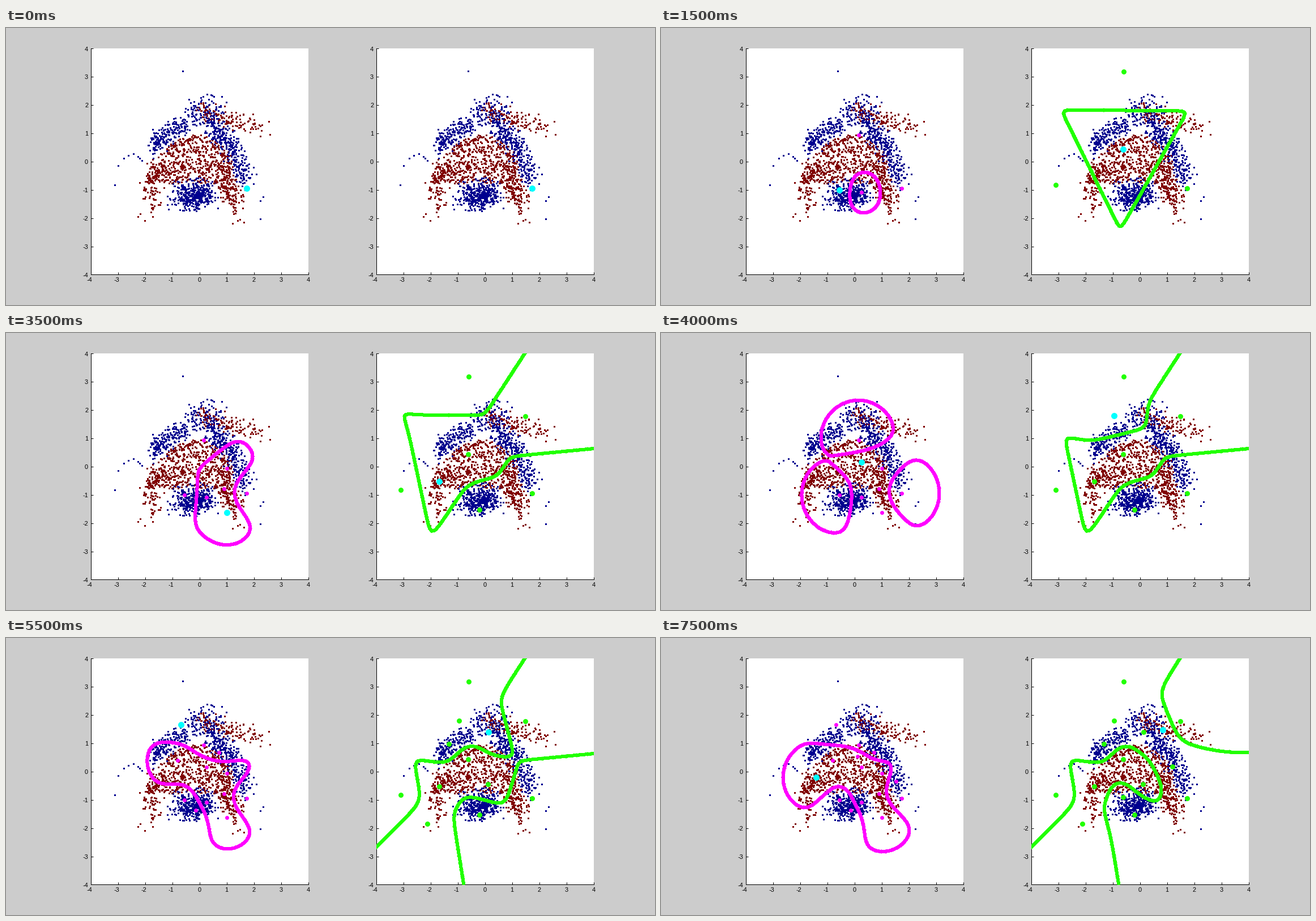
Recreate the animation shown at these times as a matplotlib script. Size 1146 by 489 pixels, loop 8000 ms.

```python
import numpy as np
import matplotlib.pyplot as plt
from matplotlib.animation import FuncAnimation

W, H, DPI = 1146, 489, 100
PX = 72 / DPI
TOP, BOTTOM, LEFTS, WIDTH = 36.5, 435.5, (149.5, 653.5), 384
NAVY, MAROON = "#00008f", "#800000"
MAGENTA, GREEN, CYAN = "#ff00ff", "#21ff00", "#00ffff"
GAMMA = 2.0

# Queried points in order: x, y, class (1 = red, -1 = blue)
LEFT = np.array([
    (1.73, -.94, -1), (.15, .95, -1), (.27, -1.08, 1), (-.55, -1.0, -1),
    (.90, -.78, 1), (1.0, -.07, 1), (1.02, -1.63, 1), (.25, .17, 1),
    (-.80, .40, 1), (.72, .68, -1), (-.13, -1.37, -1), (-.68, 1.67, -1),
    (.12, .55, 1), (1.53, -.35, -1), (-1.40, -.21, 1)])
RIGHT = np.array([
    (1.73, -.94, -1), (-3.1, -.83, -1), (-.60, 3.19, -1), (-.62, .44, 1),
    (-.20, -1.53, -1), (1.48, 1.78, 1), (-1.68, -.52, 1), (-.95, 1.81, -1),
    (.11, -.45, 1), (-2.12, -1.85, 1), (-1.33, .99, -1), (.13, 1.40, -1),
    (1.20, .19, -1), (-.62, -.91, -1), (.85, 1.48, -1)])
SHOWN = [1, 2, 3, 4, 5, 6, 6, 7, 8, 9, 10, 12, 12, 13, 14, 15]

axis = np.linspace(-4.1, 4.1, 104)
GX, GY = np.meshgrid(axis, axis)
GRID = np.column_stack([GX.ravel(), GY.ravel()])


def kernel(a, b):
    return np.exp(-GAMMA * ((a[:, None] - b[None]) ** 2).sum(-1))


def svm_field(pts, y):
    """Hard-margin RBF classifier solved with a small active set."""
    K = kernel(pts, pts)
    act = list(range(len(y)))
    for _ in range(80):
        ya = y[act]
        A = np.zeros((len(act) + 1,) * 2)
        A[0, 1:] = A[1:, 0] = ya
        A[1:, 1:] = np.outer(ya, ya) * K[np.ix_(act, act)]
        sol = np.linalg.solve(A, np.r_[0, np.ones(len(act))])
        bias, alpha = sol[0], sol[1:]
        if alpha.min() < 0:
            act.pop(int(alpha.argmin()))
            continue
        margin = y * (K[:, act] @ (alpha * ya) + bias)
        worst = int(margin.argmin())
        if margin[worst] > 1 - 1e-6:
            break
        act.append(worst)
    return kernel(GRID, pts[act]) @ (alpha * ya) + bias


def parzen_field(pts, y):
    K = kernel(GRID, pts)
    return np.log(K[:, y > 0].sum(1)) - np.log(K[:, y < 0].sum(1))


def boundary(ax, field, data):
    """Zero line of the field, plus the spots where the stroke steps."""
    pts, y = data[:, :2], data[:, 2]
    if abs(y.sum()) == len(y):
        return np.empty((0, 2)), np.empty((0, 2))
    cs = ax.contour(GX, GY, field(pts, y).reshape(GX.shape), [0])
    segs = [s for s in cs.allsegs[0] if len(s) > 2]
    cs.remove()
    line, bumps = [], []
    for s in segs:
        cell = np.round(s * (24, 25))
        step = (np.diff(cell, axis=0) != 0).all(1)
        bumps.append(s[1:][step])
        line += [s, [[np.nan, np.nan]]]
    return np.vstack(line), np.vstack(bumps)


def band(rng, n, xs, ys, sx, sy):
    """Points scattered around a polyline."""
    t = rng.uniform(0, len(xs) - 1, n)
    knots = np.arange(len(xs))
    jitter = np.clip(rng.normal(size=(n, 2)), -2.1, 2.1) * (sx, sy)
    return np.column_stack([np.interp(t, knots, xs), np.interp(t, knots, ys)]) + jitter


def make_cloud():
    rng = np.random.default_rng(7)
    blue = np.vstack([
        band(rng, 185, [-1.7, -1.25, -.5], [.55, .95, 1.4], .16, .21),
        band(rng, 105, [-.3, .1, .7], [1.65, 1.8, 1.75], .19, .26),
        band(rng, 330, [.4, .75, 1.05, 1.4, 1.75], [1.4, .95, .65, .1, -.6], .16, .22),
        band(rng, 390, [-.75, -.2, .25], [-1.15, -1.2, -1.1], .24, .26),
        [(-.6, 3.19), (-3.1, -.83), (-2.97, -.16), (-2.78, .11), (-2.6, .22),
         (-2.42, .27), (-2.25, .17), (-2.18, .12), (-2.1, .03), (2.24, -2.04),
         (2.35, -1.25), (2.26, -1.4), (.29, 2.37), (.43, 2.35), (2.1, -.45)]])
    x = rng.uniform(-1.9, 1.2, 1200)
    y = rng.uniform(-.78, .97, 1200)
    dome = np.column_stack([x, y])[y < .95 - .42 * (x + .15) ** 2][:600]
    red = np.vstack([
        dome,
        band(rng, 95, [-1.6, -1.7, -1.85], [-.2, -.9, -1.6], .19, .26),
        band(rng, 145, [.85, 1.1, 1.35], [-.4, -1.05, -1.55], .18, .22),
        band(rng, 125, [0, .7, 1.3, 2.3], [1.9, 1.6, 1.45, 1.2], .15, .17),
        [(-2.0, -2.1), (-2.25, -1.95), (1.23, -2.2), (1.65, -2.15),
         (1.42, -2.1), (1.49, -2.05), (2.6, .95), (2.57, 1.42)]])
    pts = np.vstack([blue, red])
    colors = np.array([NAVY] * len(blue) + [MAROON] * len(red))
    order = rng.permutation(len(pts))
    return pts[order], colors[order]


# The small surplus keeps the pixel height from being rounded down
fig = plt.figure(figsize=((W + .01) / DPI, (H + .01) / DPI), dpi=DPI,
                 facecolor="#cccccc")
CLOUD, COLORS = make_cloud()


def label(x, y, s, ha):
    fig.text(x / W, 1 - y / H, s, ha=ha, va="center_baseline",
             family="Liberation Sans", size=11 * PX)


class Panel:
    def __init__(self, left, data, field, color, dot):
        self.data = data
        ax = fig.add_axes([left / W, 1 - BOTTOM / H, WIDTH / W, (BOTTOM - TOP) / H])
        ax.set(xlim=(-4, 4), ylim=(-4, 4), xticks=range(-4, 5), yticks=range(-4, 5))
        ax.tick_params(direction="in", length=4 * PX, width=PX,
                       labelbottom=False, labelleft=False)
        ax.spines[["top", "right"]].set_visible(False)
        ax.spines[["left", "bottom"]].set_linewidth(PX)
        for v in range(-4, 5):
            tick = left + WIDTH * (v + 4) / 8
            label(tick - (2.5 if v < 0 else 0), 443.5, str(v), "center")
            label(left - 4.5, BOTTOM - (BOTTOM - TOP) * (v + 4) / 8, str(v), "right")
        ax.scatter(*CLOUD.T, s=(3 * PX) ** 2, c=COLORS, marker="s",
                   linewidths=0, antialiased=False, zorder=2)

        def line(z, **kw):
            return ax.plot([], [], color=kw.pop("color", color), zorder=z,
                           antialiased=False, mew=0, **kw)[0]

        self.edge = line(3, lw=5 * PX, solid_joinstyle="round")
        self.bumps = line(3, ls="", marker="D", ms=5.3 * PX)
        self.old = line(4, ls="", marker="o", ms=dot * PX)
        self.new = line(5, ls="", marker="o", ms=11 * PX, color=CYAN)
        self.curves = {n: boundary(ax, field, data[:n]) for n in set(SHOWN)}
        ax.set(xlim=(-4, 4), ylim=(-4, 4))

    def show(self, n):
        edge, bumps = self.curves[n]
        self.edge.set_data(*edge.T)
        self.bumps.set_data(*bumps.T)
        self.old.set_data(*self.data[:n - 1, :2].T)
        self.new.set_data(*self.data[n - 1:n, :2].T)
        return [self.edge, self.bumps, self.old, self.new]


panels = [Panel(LEFTS[0], LEFT, svm_field, MAGENTA, 7),
          Panel(LEFTS[1], RIGHT, parzen_field, GREEN, 9)]


def update(i):
    return [artist for p in panels for artist in p.show(SHOWN[i])]


anim = FuncAnimation(fig, update, frames=len(SHOWN), interval=500,
                     repeat=True, repeat_delay=0, blit=False)
plt.show()
```
